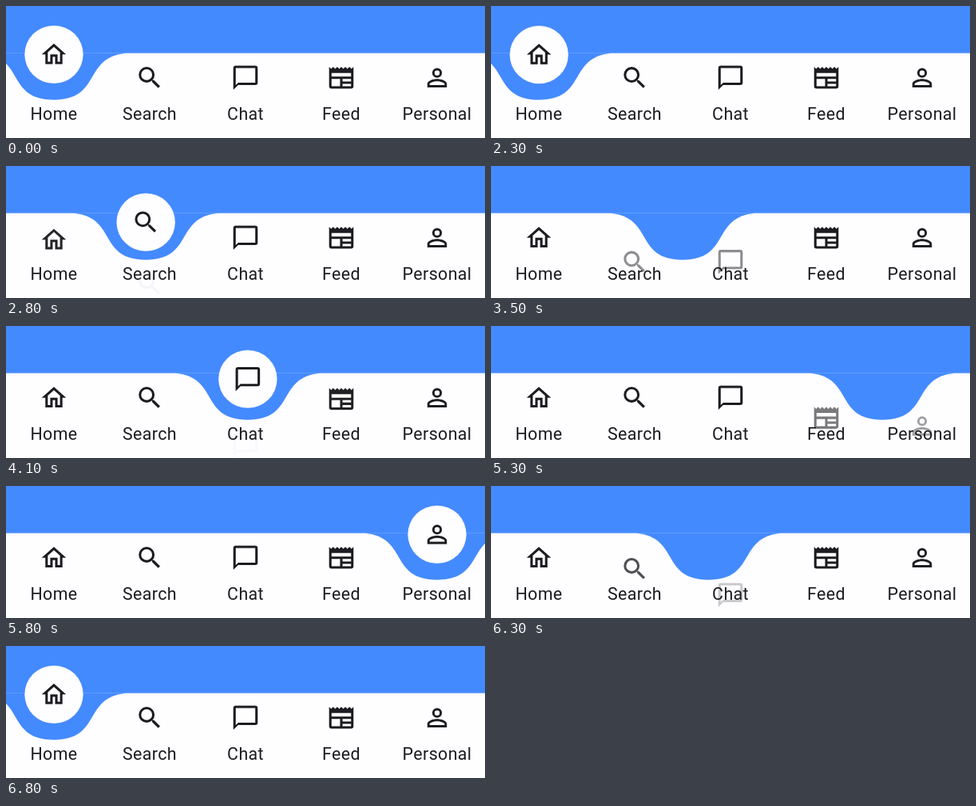
Recreate the animation shown at these times as an HTML page with a canvas. Size 600 by 167 pixels, loop 7000 ms.

```html
<!DOCTYPE html>
<html lang="en">
<head>
<meta charset="utf-8">
<title>Curved navigation bar</title>
<style>
  html, body { margin: 0; width: 100%; height: 100%; overflow: hidden; background: #448aff; }
  canvas { display: block; width: 600px; height: 167px; }
</style>
</head>
<body>
<canvas id="stage" width="600" height="167"></canvas>
<script>
const ctx = document.getElementById('stage').getContext('2d');
const WIDTH = 600, HEIGHT = 167;
const LOOP = 7000, STEP = 100, MOVE_TIME = 600;
const DP = 1.528; // pixels per layout unit
const BLUE = '#448aff', WHITE = '#fefdff', INK = '#1c1b1f';
const BAR_TOP = 59.8, BAR_HEIGHT = 107, NOTCH_DEPTH = 0.55 * BAR_HEIGHT;
const ICON_Y = 90.8, BUTTON_Y = 61.3, LABEL_Y = 144.2;

const zigzag = 'l-1.667 1.667l-1.667-1.667'.repeat(6);
const items = [
  ['Home', 'M12 5.69l5 4.5V18h-2v-6H9v6H7v-7.81zM12 3L2 12h3v8h6v-6h2v6h6v-8h3z'],
  ['Search', 'M9.5 3a6.5 6.5 0 1 0 0 13a6.5 6.5 0 1 0 0-13zm0 2a4.5 4.5 0 1 1 0 9a4.5 4.5 0 1 1 0-9z' +
    'M14.43 13.73l.28.27h.79l4.99 5L19 20.49l-5-4.99v-.79l-.27-.28z'],
  ['Chat', 'M20 2H4a2 2 0 0 0-2 2v18l4-4h14a2 2 0 0 0 2-2V4a2 2 0 0 0-2-2zm0 14H6l-2 2V4h16z'],
  ['Feed', 'M22 3' + zigzag + 'v16a2 2 0 0 0 2 2h16a2 2 0 0 0 2-2zM11 19H4v-6h7zM20 19h-7v-2h7zM20 15h-7v-2h7zM20 11H4V8h16z'],
  ['Personal', 'M12 4a4 4 0 1 0 0 8a4 4 0 1 0 0-8zm0 1.9a2.1 2.1 0 1 1 0 4.2a2.1 2.1 0 1 1 0-4.2z' +
    'M12 13c-2.67 0-8 1.34-8 4v3h16v-3c0-2.66-5.33-4-8-4zm0 1.9c2.97 0 6.1 1.46 6.1 2.1v1.1H5.9V17c0-.64 3.13-2.1 6.1-2.1z'],
].map(([label, shape]) => ({ label, icon: new Path2D(shape) }));
const SPAN = WIDTH / items.length;

const moves = [
  { start: 2285, from: 0, to: 1 },
  { start: 3200, from: 1, to: 2 },
  { start: 4034, from: 2, to: 3 },
  { start: 4970, from: 3, to: 4 },
  { start: 5980, from: 4, to: 0 },
];

const centerX = position => (position + 0.5) * SPAN;

// cubic-bezier(0.42, 0, 0.58, 1)
function easeInOut(x) {
  if (x <= 0) return 0;
  if (x >= 1) return 1;
  let low = 0, high = 1;
  for (let i = 0; i < 30; i++) {
    const u = (low + high) / 2, v = 1 - u;
    if (3 * v * v * u * 0.42 + 3 * v * u * u * 0.58 + u * u * u < x) low = u;
    else high = u;
  }
  return low * low * (3 - 2 * low);
}

function stateAt(time) {
  const move = moves.filter(m => m.start <= time).pop();
  if (!move) return { position: 0, dip: 0, active: 0 };
  const progress = easeInOut((time - move.start) / MOVE_TIME);
  return {
    position: move.from + (move.to - move.from) * progress,
    dip: 1 - Math.abs(1 - 2 * progress),
    active: progress > 0.5 ? move.to : move.from,
  };
}

function drawIcon(icon, x, y, opacity = 1) {
  ctx.save();
  ctx.globalAlpha = opacity;
  ctx.fillStyle = INK;
  ctx.translate(x, y);
  ctx.scale(DP, DP);
  ctx.translate(-12, -12);
  ctx.fill(icon, 'evenodd');
  ctx.restore();
}

function drawButton({ position, dip, active }) {
  const x = centerX(position), y = BUTTON_Y + dip * 80 * DP;
  ctx.fillStyle = WHITE;
  ctx.beginPath();
  ctx.arc(x, y, 24 * DP, 0, Math.PI * 2);
  ctx.fill();
  drawIcon(items[active].icon, x, y);
}

function drawBar(position) {
  const x = centerX(position);
  const shoulder = BAR_TOP + 0.05 * BAR_HEIGHT, bottom = BAR_TOP + NOTCH_DEPTH;
  ctx.fillStyle = WHITE;
  ctx.beginPath();
  ctx.moveTo(Math.min(0, x - 90), BAR_TOP);
  ctx.lineTo(x - 90, BAR_TOP);
  ctx.bezierCurveTo(x - 36, shoulder, x - 60, bottom, x, bottom);
  ctx.bezierCurveTo(x + 60, bottom, x + 36, shoulder, x + 90, BAR_TOP);
  ctx.lineTo(Math.max(WIDTH, x + 90), BAR_TOP);
  ctx.lineTo(Math.max(WIDTH, x + 90), HEIGHT);
  ctx.lineTo(Math.min(0, x - 90), HEIGHT);
  ctx.fill();
}

function drawItems(position) {
  ctx.font = `${14 * DP}px Roboto, sans-serif`;
  ctx.letterSpacing = `${0.25 * DP}px`;
  ctx.textAlign = 'center';
  items.forEach(({ label, icon }, index) => {
    const distance = Math.min(1, Math.abs(position - index));
    const opacity = distance < 0.99 ? distance : 1;
    drawIcon(icon, centerX(index), ICON_Y + (1 - distance) * 40 * DP, opacity);
    ctx.fillStyle = INK;
    ctx.fillText(label, centerX(index), LABEL_Y);
  });
}

function draw(time) {
  const state = stateAt(time);
  ctx.fillStyle = BLUE;
  ctx.fillRect(0, 0, WIDTH, HEIGHT);
  ctx.fillStyle = 'rgba(255, 255, 255, 0.14)';
  ctx.fillRect(0, 59, WIDTH, 1);
  drawButton(state);
  drawBar(state.position);
  drawItems(state.position);
}

function tick() {
  const time = (performance.now() + 5) % LOOP;
  draw(Math.floor(time / STEP) * STEP);
  requestAnimationFrame(tick);
}
tick();
</script>
</body>
</html>
```
